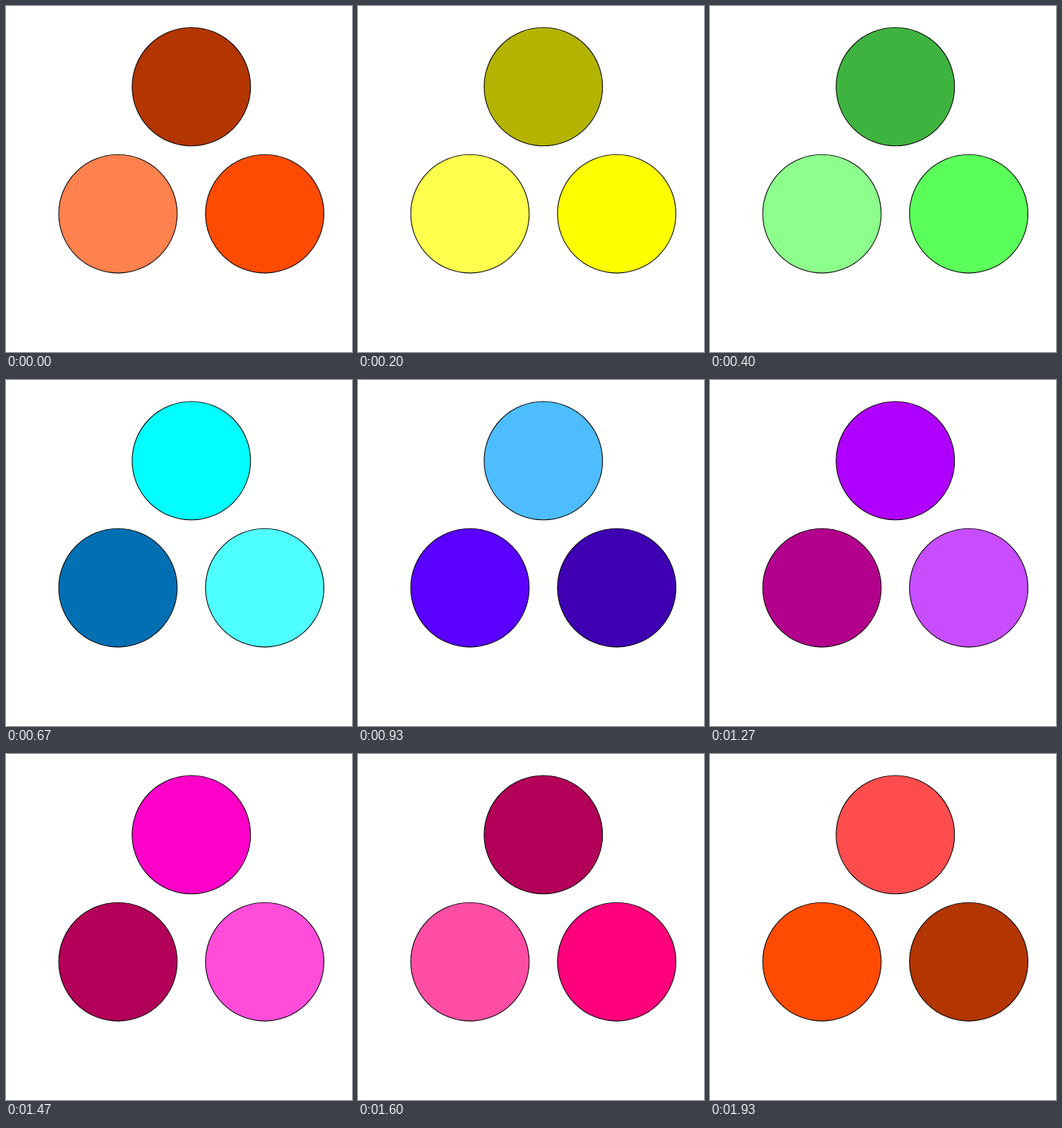
Animation, 499 px wide and 499 px high, one loop 1.99 s. Source, as an HTML page:

```html
<!DOCTYPE html>
<html lang="en">
<head>
<meta charset="utf-8">
<title>Three colour-cycling circles</title>
<style>
  html, body { margin: 0; width: 100%; height: 100%; overflow: hidden; background: #fff; }
  svg { display: block; width: 499px; height: 499px; }
  circle { r: 85.4px; stroke: #000; stroke-width: 1.1px; }
</style>
</head>
<body>
<svg viewBox="0 0 499 499"></svg>
<script>
  const LOOP = 1990;
  const STEPS_PER_MS = 15 / 1000;
  const centre = { x: 267.3, y: 238.6, distance: 122.2 };
  const hues = ['ff4b00', 'ffff00', '5aff5a', '00ffff', '00a0ff',
                '5a00ff', 'af00ff', 'ff00c8', 'ff007d', 'ff0000'];

  const channels = hex => hex.match(/../g).map(c => parseInt(c, 16));
  const mix = (hex, amount, other) =>
    `rgb(${channels(hex).map(c => Math.round(c * amount + other * (1 - amount)))})`;

  // Each hue appears as a dark, a pure and a light shade.
  const palette = hues.flatMap(h => [mix(h, 0.7, 0), mix(h, 1, 0), mix(h, 0.7, 255)]);

  // Corners of an equilateral triangle, clockwise from the top.
  const svg = document.querySelector('svg');
  const circles = [-90, 30, 150].map(degrees => {
    const angle = degrees * Math.PI / 180;
    const circle = document.createElementNS(svg.namespaceURI, 'circle');
    circle.setAttribute('cx', centre.x + centre.distance * Math.cos(angle));
    circle.setAttribute('cy', centre.y + centre.distance * Math.sin(angle));
    return svg.appendChild(circle);
  });

  const start = performance.now();

  function draw() {
    // Step times fall on the nearest 10 ms.
    const tick = Math.floor((performance.now() - start) % LOOP / 10) * 10;
    const step = Math.floor((tick + 5) * STEPS_PER_MS);
    circles.forEach((circle, i) =>
      circle.setAttribute('fill', palette[(step + i) % palette.length]));
    requestAnimationFrame(draw);
  }

  draw();
</script>
</body>
</html>
```
